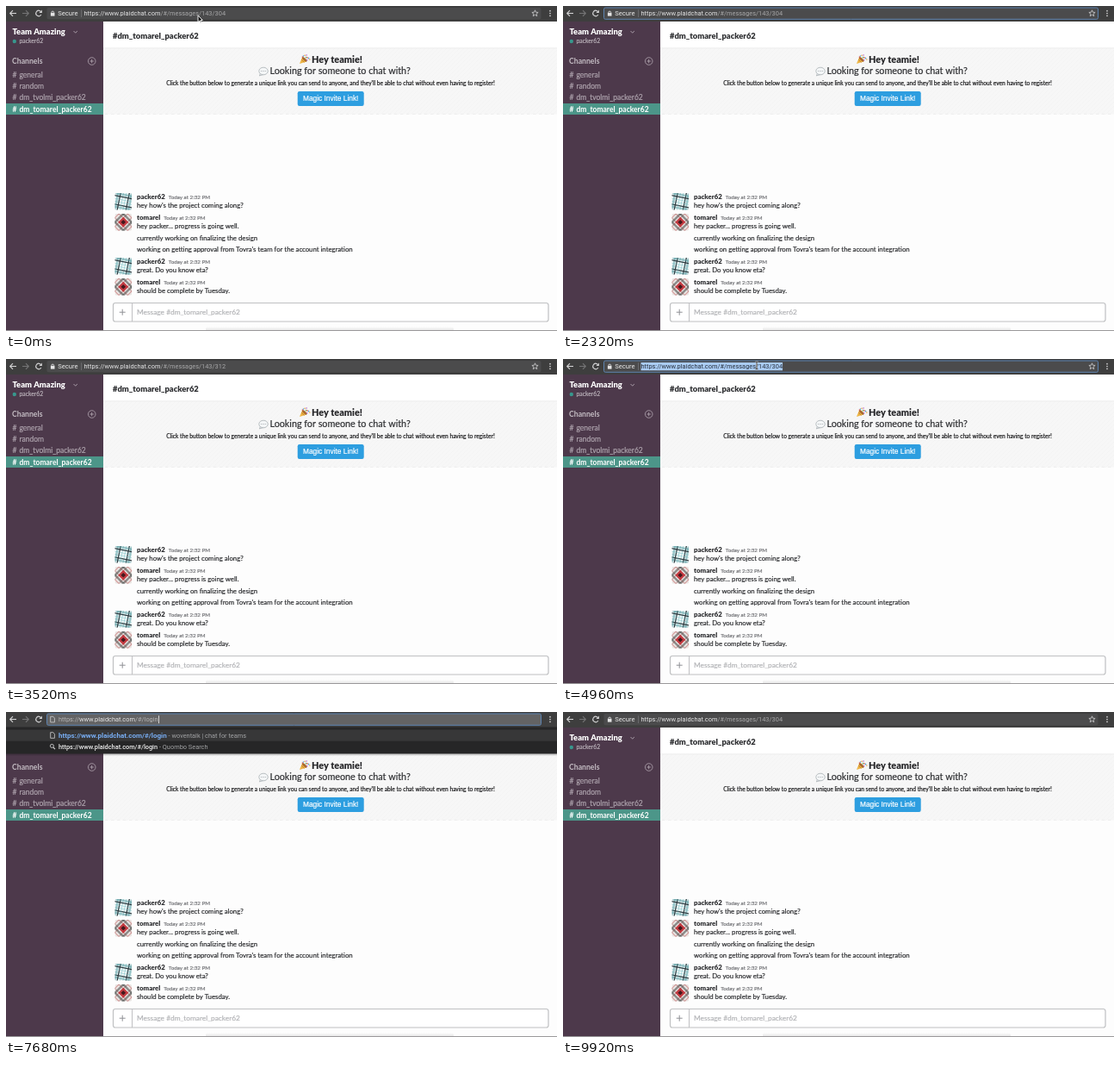
Animation, 640 px wide and 377 px high, one loop 10000 ms. Source, as an HTML page with a canvas:

```html
<!DOCTYPE html>
<html lang="en">
<head>
<meta charset="utf-8">
<title>Team chat address bar</title>
<style>
html, body { margin: 0; width: 100%; height: 100%; overflow: hidden; background: #fff; }
canvas { display: block; width: 640px; height: 377px; }
</style>
</head>
<body>
<canvas id="stage"></canvas>
<script>
const W = 640, H = 377, LOOP = 10000;
const canvas = document.getElementById('stage');
const ratio = window.devicePixelRatio || 1;
canvas.width = W * ratio;
canvas.height = H * ratio;
const c = canvas.getContext('2d');

const LATO = 'Lato, sans-serif', UI = 'Roboto, sans-serif';
const URL_FONT = '7.4px ' + UI;
const SITE = 'https://www.plaidchat.com';
const ROOM = '/#/messages/143/';
const HOME = ROOM + '304';
const ME = 'packer62', MATE = 'tomarel';
const DM = 'dm_' + MATE + '_' + ME;
const SIDE = 113;

function box(x, y, w, h, fill) {
  c.fillStyle = fill;
  c.fillRect(x, y, w, h);
}

function rounded(x, y, w, h, r, fill, stroke, line = 1) {
  c.beginPath();
  c.roundRect(x, y, w, h, r);
  if (fill) { c.fillStyle = fill; c.fill(); }
  if (stroke) { c.strokeStyle = stroke; c.lineWidth = line; c.stroke(); }
}

function disc(x, y, r, fill, stroke, line = 1) {
  c.beginPath();
  c.arc(x, y, r, 0, 7);
  if (fill) { c.fillStyle = fill; c.fill(); }
  if (stroke) { c.strokeStyle = stroke; c.lineWidth = line; c.stroke(); }
}

function path(points, stroke, line = 1, fill) {
  c.beginPath();
  points.forEach(([x, y], i) => i ? c.lineTo(x, y) : c.moveTo(x, y));
  if (fill) { c.closePath(); c.fillStyle = fill; c.fill(); }
  if (stroke) { c.strokeStyle = stroke; c.lineWidth = line; c.stroke(); }
}

// Draws text, a little heavier when asked, and returns the x where it ends.
function text(s, x, y, font, color, align = 'left', heavy = 0) {
  c.font = font;
  c.fillStyle = color;
  c.textAlign = align;
  c.fillText(s, x, y);
  if (heavy) {
    c.strokeStyle = color;
    c.lineWidth = heavy;
    c.strokeText(s, x, y);
  }
  return x + c.measureText(s).width;
}

function lato(s, x, y, size, color, weight = 400, align) {
  return text(s, x, y, `${weight} ${size}px ${LATO}`, color, align, weight === 400 ? 0.2 : 0);
}

function widthOf(s, font) {
  c.font = font;
  return c.measureText(s).width;
}

function sidebar() {
  box(0, 18, SIDE, H, '#4d394b');
  lato('Team Amazing', 7.5, 33.2, 9.38, '#fff', 900);
  path([[78.5, 29], [80.7, 31.2], [82.9, 29]], '#b3a8b2', 0.9);
  disc(9.8, 41, 2.2, '#38978d');
  lato(ME, 15.5, 43.4, 6.8, '#b8afb7');
  lato('Channels', 7, 67, 8.7, '#c4bcc3', 700);
  disc(99.7, 64, 4.3, null, '#b3a8b2', 0.8);
  box(97.5, 63.6, 4.4, 0.8, '#b3a8b2');
  box(99.3, 61.8, 0.8, 4.4, '#b3a8b2');
  box(0, 113, SIDE, 13, '#4c9689');
  ['general', 'random', 'dm_tvolmi_' + ME, DM].forEach((name, i) => {
    const y = 82.5 + i * 13.4, on = i === 3;
    const color = on ? '#fff' : '#aea3ad';
    lato('#', 7.5, y, 8.5, color, on ? 700 : 400);
    lato(name, 15.5, y, 8.5, color, on ? 700 : 400);
  });
}

function popper(x, y) {
  path([[x, y + 10], [x + 3, y + 2.5], [x + 8, y + 7.5]], null, 0, '#edb545');
  path([[x + 2, y + 5], [x + 5.5, y + 8.5]], '#c8862f', 1);
  c.beginPath();
  c.ellipse(x + 5.7, y + 4.8, 3.7, 1.4, Math.PI / 4, 0, 7);
  c.fillStyle = '#a76a2e';
  c.fill();
  const colors = ['#e2574c', '#4aa3df', '#e8a33d', '#b05cc6', '#5fb760'];
  for (let i = 0; i < 9; i++) {
    const a = -1.9 + i * 0.27, r = 4 + (i * 5 % 4);
    disc(x + 4.8 + Math.cos(a) * r, y + 5 + Math.sin(a) * r * 0.8, 0.8, colors[i % 5]);
  }
}

function balloon(x, y) {
  path([[x - 3.5, y + 2.5], [x - 4.6, y + 5.4], [x, y + 4]], '#a9b0b4', 0.8, '#f4f6f7');
  c.beginPath();
  c.ellipse(x, y, 5.2, 4.3, 0, 0, 7);
  c.fillStyle = '#f4f6f7';
  c.fill();
  c.strokeStyle = '#a9b0b4';
  c.lineWidth = 0.8;
  c.stroke();
  for (let i = -1; i < 2; i++) disc(x + i * 2.2, y, 0.6, '#9aa1a6');
}

function banner() {
  box(SIDE, 49, W, 76.5, '#f7f7f7');
  c.save();
  c.beginPath();
  c.rect(SIDE, 49, W, 76.5);
  c.clip();
  for (let x = 40; x < 640; x += 5) path([[x, 126], [x + 77, 49]], '#f4f4f4', 1);
  c.restore();
  for (let x = 115; x < W; x += 7) box(x, 124.8, 3.5, 1.2, '#efefef');
  popper(341, 57);
  lato('Hey teamie!', 355, 66, 10.85, '#262629', 900);
  balloon(299, 75.5);
  lato('Looking for someone to chat with?', 306.5, 79.2, 10.78, '#2c2d30');
  lato("Click the button below to generate a unique link you can send to anyone, and they'll be able to chat without even having to register!",
    377, 91.7, 6.64, '#1d1d1f', 400, 'center');
  rounded(338.7, 99, 77, 17, 2.2, '#2d9ee0');
  text('Magic Invite Link!', 377.2, 110.4, '8.34px "Liberation Sans", Arial, sans-serif', '#fff', 'center', 0.2);
}

function avatar(x, y, mate) {
  c.save();
  c.beginPath();
  c.roundRect(x, y, 19.5, 19.5, 1.5);
  c.clip();
  box(x, y, 20, 20, mate ? '#e9e5e3' : '#eef6f6');
  c.translate(x + 9.75, y + 9.75);
  c.rotate(mate ? Math.PI / 4 : 0.2);
  for (let turn = 0; turn < 4; turn++) {
    if (mate) {
      box(5.6, -16, 2.4, 32, 'rgba(60,66,64,.55)');
      box(10, -16, 1, 32, 'rgba(190,65,65,.5)');
      box(2.6, -16, 1.4, 32, 'rgba(150,60,60,.35)');
    } else {
      box(4.4, -16, 1.2, 32, '#2b3a3f');
      box(6.6, -16, 2.4, 32, 'rgba(80,150,155,.5)');
      box(1.2, -16, 0.8, 32, 'rgba(120,195,200,.6)');
    }
    c.rotate(Math.PI / 2);
  }
  if (mate) {
    box(-4.2, -4.2, 8.4, 8.4, 'rgba(196,36,44,.85)');
    box(-2, -2, 4, 4, '#43191d');
  }
  c.restore();
}

function message(y, name, lines) {
  avatar(126.5, y - 4, name === MATE);
  const end = lato(name, 152, y + 2.8, 7.82, '#2c2d30', 900);
  lato('Today at 2:32 PM', end + 4, y + 2.6, 6.25, '#717276');
  lines.forEach((s, i) => lato(s, 152, y + 13.2 + i * 13.5, 7.77, '#2c2d30'));
}

function page() {
  box(0, 0, W, H, '#fdfdfd');
  box(SIDE, 18, W, 31, '#fff');
  sidebar();
  lato('#' + DM, 124, 37.7, 9.38, '#2c2d30', 900);
  banner();
  box(SIDE, 48.5, W, 0.8, '#e8e8e8');
  message(221, ME, ["hey how's the project coming along?"]);
  message(245, MATE, ['hey packer... progress is going well.', 'currently working on finalizing the design',
    "working on getting approval from Tovra's team for the account integration"]);
  message(296, ME, ['great. Do you know eta?']);
  message(320, MATE, ['should be complete by Tuesday.']);
  rounded(124.5, 344.5, 505.5, 21.5, 2.5, '#fff', '#bfc0c2', 1.2);
  box(146, 344.5, 1, 21.5, '#bfc0c2');
  box(131.7, 354.7, 7, 1, '#8f9094');
  box(134.7, 351.7, 1, 7, '#8f9094');
  lato('Message #' + DM, 152, 358.3, 8.34, '#b2b3b6');
  const shade = c.createLinearGradient(0, 372, 0, 376);
  shade.addColorStop(0, 'rgba(200,200,200,0)');
  shade.addColorStop(1, 'rgba(195,195,195,.4)');
  rounded(232, 372, 288, 6, 3, shade);
  box(0, 376, W, 1, '#9b999b');
}

function pageIcon(x, y) {
  path([[x - 2.3, y - 3.3], [x + 0.8, y - 3.3], [x + 2.4, y - 1.5], [x + 2.4, y + 3.3],
    [x - 2.3, y + 3.3], [x - 2.3, y - 3.3]], '#d0d0d1', 0.8);
}

function starIcon(x, y, color) {
  const points = [];
  for (let i = 0; i <= 10; i++) {
    const a = -Math.PI / 2 + i * Math.PI / 5, r = i % 2 ? 1.7 : 3.8;
    points.push([x + Math.cos(a) * r, y + Math.sin(a) * r]);
  }
  path(points, color, 0.8);
}

function toolbar(s) {
  box(0, 0, W, 18, '#3e3e3e');
  const light = '#d2d2d3';
  path([[8, 5.2], [4.7, 8.5], [8, 11.8]], light, 1.1);
  path([[5, 8.5], [12, 8.5]], light, 1.1);
  path([[23, 5.2], [26.3, 8.5], [23, 11.8]], '#747475', 1.1);
  path([[19, 8.5], [26, 8.5]], '#747475', 1.1);
  c.beginPath();
  c.arc(38, 8.5, 3.2, 0.5, 5.6);
  c.strokeStyle = light;
  c.lineWidth = 1.1;
  c.stroke();
  path([[41.9, 4.4], [41.9, 8], [38.4, 8]], null, 0, light);
  rounded(47.5, 2, 574, 13.3, 1.8, s.typed ? '#636364' : '#4b4b4c');
  if (s.focus) rounded(47.5, 2, 574, 13.3, 1.8, null, '#5d83b0', 1);

  let x = 90.5;
  if (s.typed) {
    x = 61;
    pageIcon(54, 8.6);
  } else {
    box(51.9, 7.8, 4.6, 3.8, '#e4e4e5');
    c.beginPath();
    c.arc(54.2, 7.6, 1.5, Math.PI, 0);
    c.strokeStyle = '#e4e4e5';
    c.lineWidth = 0.9;
    c.stroke();
    text('Secure', 60.2, 11.3, '7.6px ' + UI, '#ececec');
    box(87, 4.3, 0.7, 8.7, '#77777a');
    starIcon(614.5, 8.6, light);
  }
  const full = SITE + s.tail;
  const at = n => x + widthOf(full.slice(0, n), URL_FONT);
  const dim = s.typed ? '#b4b4b5' : '#a8a8a9';
  const scheme = text('https://', x, 11.3, URL_FONT, s.typed ? dim : '#e5e5e6');
  const host = text(SITE.slice(8), scheme, 11.3, URL_FONT, '#e5e5e6');
  text(s.tail, host, 11.3, URL_FONT, dim);
  if (s.from !== undefined) {
    const left = at(s.from), right = at(full.length);
    box(left, 4, right - left, 9.3, '#a9cbf3');
    text(full.slice(s.from), left, 11.3, URL_FONT, '#28323f');
  }
  if (s.caret) box(at(full.length) + 0.4, 4.2, 0.8, 9, '#f0f0f0');
  for (let i = -1; i < 2; i++) disc(632, 8.5 + i * 2.8, 0.85, light);
}

function dropdown(tail) {
  box(0, 17.5, W, 31, '#262627');
  box(0, 20.5, W, 13.2, '#373738');
  const full = SITE + tail;
  pageIcon(54, 27);
  let end = text(full, 61, 29.7, '700 8.05px ' + UI, '#78adf2');
  if (tail.startsWith('/#/l')) text(' - woventalk | chat for teams', end, 29.7, URL_FONT, '#a2a3a5');
  disc(53.4, 39.4, 2, null, '#d0d0d1', 0.9);
  path([[54.9, 41], [57, 43.1]], '#d0d0d1', 1.1);
  end = text(full, 61, 42.9, '500 7.35px ' + UI, '#f0f0f0');
  text(' - Quombo Search', end, 42.9, URL_FONT, '#a2a3a5');
  const shade = c.createLinearGradient(0, 48.5, 0, 51.5);
  shade.addColorStop(0, 'rgba(0,0,0,.22)');
  shade.addColorStop(1, 'rgba(0,0,0,0)');
  box(0, 48.5, W, 3, shade);
}

function arrow(x, y) {
  path([[x, y], [x, y + 7.6], [x + 1.8, y + 6], [x + 3, y + 8.8], [x + 4.1, y + 8.3],
    [x + 3, y + 5.6], [x + 5.4, y + 5.5], [x, y]], '#eee', 1, '#111');
}

function beam(x, y) {
  for (const [color, line] of [['#eee', 1.6], ['#111', 0.8]]) {
    path([[x, y - 4], [x, y + 4]], color, line);
    path([[x - 1.5, y - 4.2], [x + 1.5, y - 4.2]], color, line);
    path([[x - 1.5, y + 4.2], [x + 1.5, y + 4.2]], color, line);
  }
}

// Each pointer trip lists [time, x, y].
const trips = [
  [[0, 223, 11], [160, 223, 11], [400, 225, 7.5], [1040, 225, 7.5], [1280, 259, 8], [1760, 259, 8]],
  [[4240, 250, 52], [4640, 225, 7.5], [5200, 225, 7.5], [5600, 258, 8], [6160, 258, 8], [6480, 190, 8], [7120, 190, 8]]
];

const ease = k => k * k * (3 - 2 * k);

function pointer(t) {
  for (const trip of trips) {
    for (let i = 1; i < trip.length; i++) {
      const [t0, x0, y0] = trip[i - 1], [t1, x1, y1] = trip[i];
      if (t < t0 || t >= t1) continue;
      const e = ease((t - t0) / (t1 - t0));
      return [x0 + (x1 - x0) * e, y0 + (y1 - y0) * e];
    }
  }
}

// The address bar at each hard change; every entry holds until the next.
const typing = tail => ({ tail, typed: true, focus: true, caret: true });
const steps = [
  [0, { tail: HOME }],
  [480, { tail: HOME, focus: true, from: 0 }],
  [1280, { tail: HOME, focus: true, caret: true }],
  [1760, { tail: HOME, focus: true }],
  [2000, { tail: HOME, focus: true, caret: true }],
  [2160, { tail: HOME, focus: true }],
  [2400, typing(ROOM + '30')],
  [2480, typing(ROOM + '3')],
  [2560, typing(ROOM + '31')],
  [2800, typing(ROOM + '312')],
  [3280, { tail: ROOM + '312' }],
  [3600, { tail: HOME }],
  [4720, { tail: HOME, focus: true, from: 0 }],
  [5360, { tail: HOME, focus: true, caret: true }],
  [6160, { tail: HOME, focus: true, drag: true }],
  [7200, typing('/#/l')],
  [7280, typing('/#/lo')],
  [7440, typing('/#/log')],
  [7520, typing('/#/logi')],
  [7600, typing('/#/login')],
  [7840, { tail: '/#/login' }],
  [8160, { tail: HOME }]
];

function stateAt(t) {
  const s = { ...steps.filter(([start]) => start <= t).pop()[1] };
  if (s.drag) {
    const e = ease(Math.min(1, (t - 6160) / 320));
    const last = SITE.length + HOME.length;
    s.from = Math.round(last - e * (last - SITE.length - 3));
  }
  return s;
}

function draw(t) {
  c.setTransform(ratio, 0, 0, ratio, 0, 0);
  c.textBaseline = 'alphabetic';
  c.lineJoin = 'round';
  const s = stateAt(t);
  page();
  toolbar(s);
  if (s.typed) dropdown(s.tail);
  const p = pointer(t);
  if (p) (p[1] > 9.5 ? arrow : beam)(p[0], p[1]);
}

const start = performance.now();
function tick() {
  const t = (performance.now() - start) % LOOP;
  draw(Math.floor(t / 80) * 80);
  requestAnimationFrame(tick);
}
tick();
</script>
</body>
</html>
```
